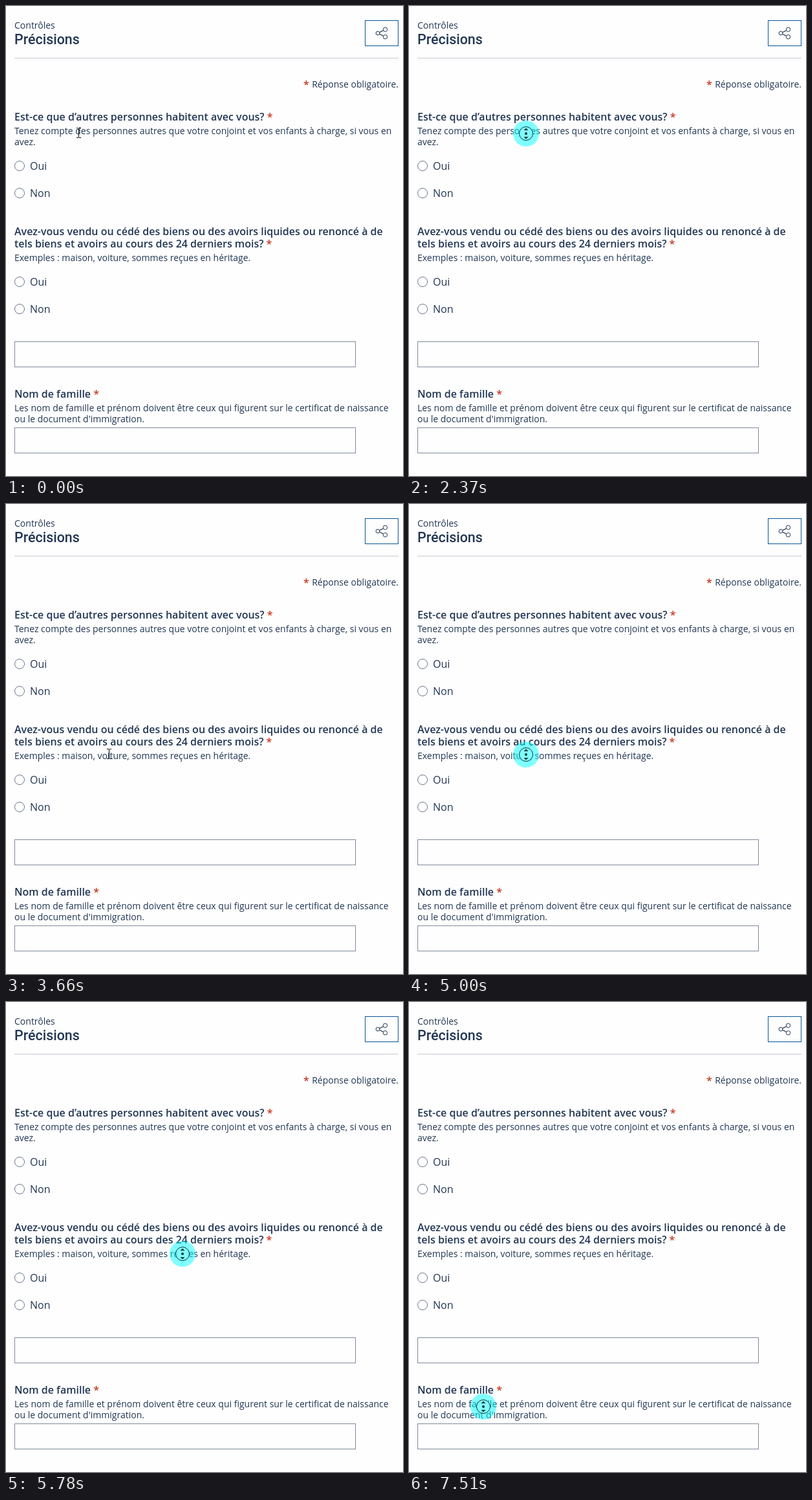
Write an HTML page with a canvas that moves like this. It is 614 px wide and 726 px high and loops after 7990 ms.

```html
<!DOCTYPE html>
<html lang="fr">
<head>
<meta charset="utf-8">
<title>Précisions</title>
<style>
  html, body { margin: 0; width: 100%; height: 100%; overflow: hidden; background: #fefefe; }
  body { position: relative; color: #223654; font: 14px "Open Sans", sans-serif; }
  p { position: absolute; margin: 0; white-space: pre; }
  .big { font-size: 16px; }
  .strong { font-size: 16px; font-weight: 600; }
  .title { font: 500 21.4px Roboto, sans-serif; }
  .right { right: auto; transform: translateX(-100%); }
  b { color: #cb381f; font-weight: 600; }
  canvas { position: absolute; left: 0; top: 0; }
</style>
</head>
<body>
<canvas id="stage" width="614" height="726"></canvas>
<script>
const LOOP = 7990, STEP = 30;
const ctx = document.getElementById('stage').getContext('2d');

// Text: x, baseline, content, class
const ASCENT = { '': 15, big: 17, strong: 17, title: 20, right: 15 };
const STAR = ' <b>*</b>';
const lines = [
  [13, 35, 'Contrôles'],
  [13, 59, 'Précisions', 'title'],
  [460, 127, '<b>*</b>', 'strong'],
  [607, 126, 'Réponse obligatoire.', 'right'],
  [13, 177, 'Est-ce que d’autres personnes habitent avec vous?' + STAR, 'strong'],
  [13, 198, 'Tenez compte des personnes autres que votre conjoint et vos enfants à charge, si vous en'],
  [13, 215, 'avez.'],
  [37, 253, 'Oui', 'big'],
  [37, 295, 'Non', 'big'],
  [13, 354, 'Avez-vous vendu ou cédé des biens ou des avoirs liquides ou renoncé à de', 'strong'],
  [13, 373, 'tels biens et avoirs au cours des 24 derniers mois?' + STAR, 'strong'],
  [13, 394, 'Exemples : maison, voiture, sommes reçues en héritage.'],
  [37, 432, 'Oui', 'big'],
  [37, 474, 'Non', 'big'],
  [13, 605, 'Nom de famille' + STAR, 'strong'],
  [13, 626, 'Les nom de famille et prénom doivent être ceux qui figurent sur le certificat de naissance'],
  [13, 643, "ou le document d'immigration."]
];
for (const [x, base, html, cls = ''] of lines) {
  const p = document.createElement('p');
  p.className = cls;
  p.innerHTML = html;
  p.style.left = x + 'px';
  p.style.top = base - ASCENT[cls] + 'px';
  document.body.insertBefore(p, ctx.canvas);
}

// Pointer: time, x, y, way to the next point
const HOLD = 0, LINE = 1, EASE = 2;
const path = [
  [0, 110, 195, HOLD], [400, 110, 196, HOLD], [430, 111, 197, HOLD],
  [840, 111, 198, HOLD], [870, 111, 199, HOLD], [1500, 111, 198, HOLD],
  [1920, 111, 198, LINE], [1950, 114, 198, LINE], [2730, 238, 197, LINE],
  [2790, 243, 197, HOLD], [2920, 243, 197, EASE], [3480, 163, 401, LINE],
  [3540, 163, 399, LINE], [3660, 157, 385, HOLD],
  [4850, 157, 385, LINE], [5000, 181, 387, LINE], [5660, 264, 389, LINE],
  [5780, 273, 389, HOLD], [5880, 273, 389, EASE], [6480, 154, 611, LINE],
  [6510, 150, 613, LINE], [6820, 115, 625, HOLD]
];
const presses = [[1660, 2920, 1690], [4520, 5880, 4520], [7510, LOOP, 7510]];

// Areas with a text cursor: top, bottom, right edge
const textAreas = [
  [185, 202, 598], [202, 219, 46], [338, 357, 583], [357, 377, 411],
  [380, 398, 379], [518, 558, 541], [591, 609, 144], [612, 629, 592], [629, 646, 214]
];

function pointerAt(t) {
  let i = path.length - 1;
  while (path[i][0] > t) i--;
  const [t0, x0, y0, way] = path[i];
  if (way === HOLD) return [x0, y0];
  const [t1, x1, y1] = path[i + 1];
  let k = Math.floor((t - t0) / STEP) * STEP / (t1 - t0);
  if (way === EASE) k = k * k * (3 - 2 * k);
  return [Math.round(x0 + (x1 - x0) * k), Math.round(y0 + (y1 - y0) * k)];
}

function disc(x, y, r, fill, stroke) {
  ctx.beginPath();
  ctx.arc(x, y, r, 0, Math.PI * 2);
  if (fill) { ctx.fillStyle = fill; ctx.fill(); }
  if (stroke) { ctx.strokeStyle = stroke; ctx.stroke(); }
}

function box(x, y, w, h, color) {
  ctx.strokeStyle = color;
  ctx.strokeRect(x + 0.5, y + 0.5, w - 1, h - 1);
}

function poly(points, fill, stroke) {
  ctx.beginPath();
  points.forEach(([x, y]) => ctx.lineTo(x, y));
  ctx.closePath();
  if (fill) { ctx.fillStyle = fill; ctx.fill(); }
  if (stroke) { ctx.strokeStyle = stroke; ctx.stroke(); }
}

function drawForm() {
  ctx.lineWidth = 1;
  ctx.fillStyle = '#c5cad2';
  ctx.fillRect(13, 80, 594, 1);
  box(555, 22, 52, 40, '#095797');
  poly([[577.6, 40.8], [583.6, 37.8]], null, '#223654');
  poly([[577.6, 43.2], [583.6, 46.2]], null, '#223654');
  disc(575, 42, 2.9, null, '#223654');
  disc(586.5, 36.3, 3.2, null, '#223654');
  disc(586.5, 47.7, 3.2, null, '#223654');
  for (const y of [247, 289, 426, 468]) disc(21, y, 7.5, '#fff', '#6b778a');
  box(13, 518, 528, 40, '#808a9d');
  box(13, 651, 528, 40, '#808a9d');
}

function drawBeam() {
  ctx.fillStyle = '#000';
  for (const y of [-7, 8]) {
    ctx.fillRect(-1, y, 3, 1);
    ctx.fillRect(3, y, 3, 1);
  }
  ctx.fillRect(2, -6, 1, 14);
}

function drawArrow() {
  poly([[0.5, 0.8], [0.5, 16.2], [4, 12.8], [6.5, 18.5], [8.8, 17.5], [6.4, 12], [11.3, 11.6]], '#fff', '#000');
}

function drawScroll() {
  const ink = '#083838';
  disc(0, 0, 10.5, '#80ffff', ink);
  disc(0, 0, 2, ink);
  for (const s of [-1, 1]) poly([[-3.5, 5 * s], [3.5, 5 * s], [0, 8.6 * s]], ink);
}

function draw(t) {
  const [x, y] = pointerAt(t);
  const press = presses.find(([from, to]) => t >= from && t < to);
  const overText = textAreas.some(([top, bottom, right]) => y >= top && y < bottom && x >= 13 && x <= right);
  ctx.clearRect(0, 0, 614, 726);
  drawForm();
  ctx.save();
  ctx.translate(x, y);
  if (press) disc(0, 0, 20, 'rgba(0,255,255,0.5)');
  if (press && t >= press[2]) drawScroll();
  else if (overText) drawBeam();
  else drawArrow();
  ctx.restore();
}

const start = performance.now();
function tick() {
  draw((performance.now() - start) % LOOP);
  requestAnimationFrame(tick);
}
tick();
</script>
</body>
</html>
```
